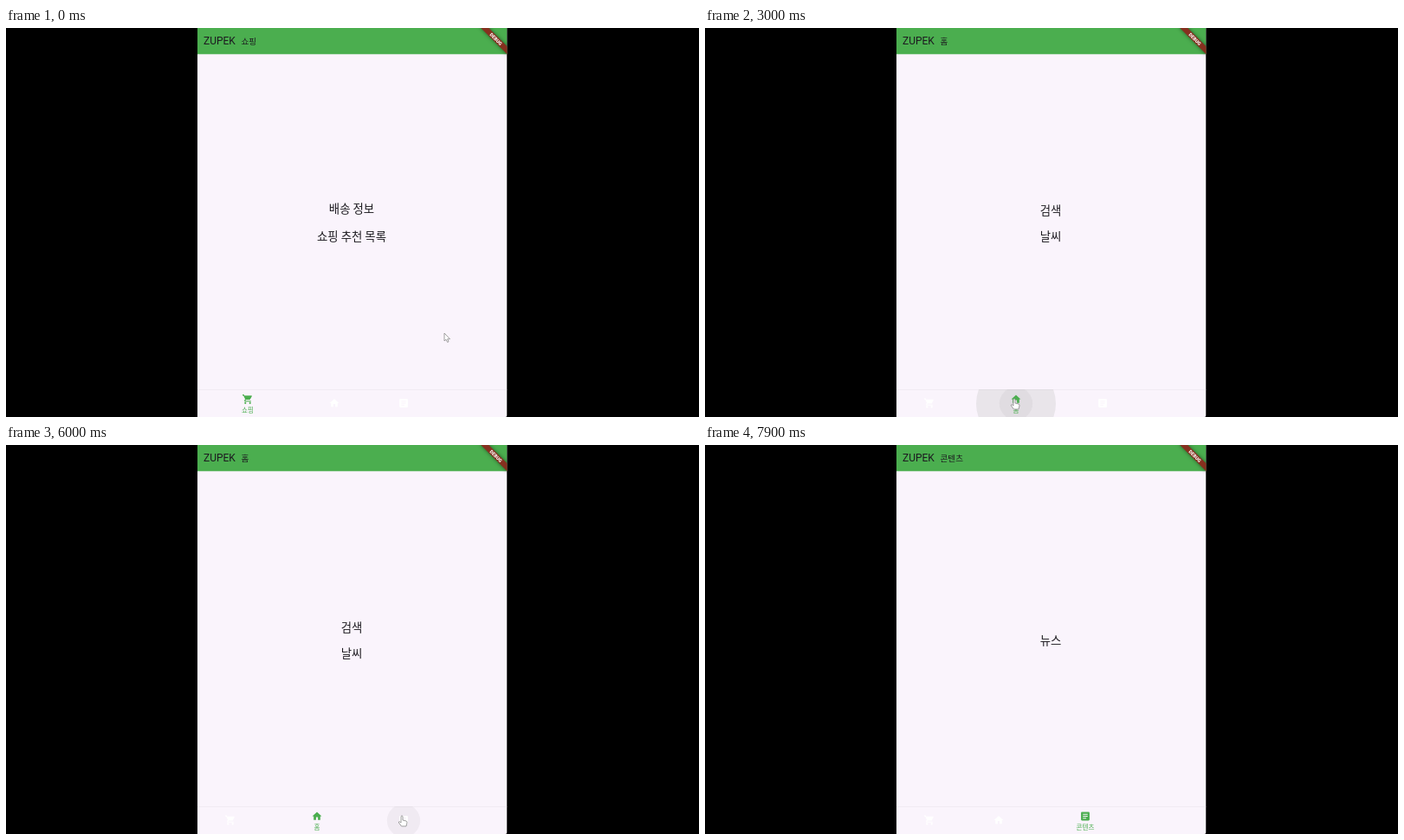
Animation, 800 px wide and 450 px high, one loop 8000 ms. Source, as an HTML page with a canvas:

```html
<!DOCTYPE html>
<html lang="ko">
<head>
<meta charset="utf-8">
<style>
  html, body { margin: 0; width: 100%; height: 100%; overflow: hidden; background: #000; }
  canvas { display: block; width: 800px; height: 450px; }
</style>
</head>
<body>
<canvas id="stage" width="800" height="450"></canvas>
<script>
const ctx = document.getElementById('stage').getContext('2d');
const LOOP = 8000, STEP = 100;
const LEFT = 221, RIGHT = 578.5, NAV_TOP = 418;
const GREEN = '#4bae4f', SURFACE = '#faf4fc', INK = '#1d1b20';
const KOREAN = '"Noto Sans CJK KR", "Noto Sans CJK", sans-serif';
const LATIN = 'Roboto, sans-serif';

const tabs = [
  { name: '쇼핑', lines: [['배송 정보', 214.3], ['쇼핑 추천 목록', 245.8]],
    icon: 'M7 18c-1.1 0-1.99.9-1.99 2S5.9 22 7 22s2-.9 2-2-.9-2-2-2zM1 2v2h2l3.6 7.59-1.35 2.45c-.16.28-.25.61-.25.96 0 1.1.9 2 2 2h12v-2H7.42c-.14 0-.25-.11-.25-.25l.03-.12.9-1.63h7.45c.75 0 1.41-.41 1.75-1.03l3.58-6.49c.08-.14.12-.31.12-.48 0-.55-.45-1-1-1H5.21l-.94-2H1zm16 16c-1.1 0-1.99.9-1.99 2s.89 2 1.99 2 2-.9 2-2-.9-2-2-2z' },
  { name: '홈', lines: [['검색', 216], ['날씨', 245.8]],
    icon: 'M10 20v-6h4v6h5v-8h3L12 3 2 12h3v8z' },
  { name: '콘텐츠', lines: [['뉴스', 230.8]],
    icon: 'M19 3H5c-1.1 0-2 .9-2 2v14c0 1.1.9 2 2 2h14c1.1 0 2-.9 2-2V5c0-1.1-.9-2-2-2zm-5 14H7v-2h7v2zm3-4H7v-2h10v2zm0-4H7V7h10v2z' }
];
tabs.forEach(tab => tab.path = new Path2D(tab.icon));

const arrow = new Path2D('M0 0V9L2 7.3 3.6 10.5 5 9.8 3.6 6.8H6.5Z');
const hand = new Path2D('M-1 .5Q0-1 1 .5V5L5 6Q6.3 6.4 6 8L5 12H-.5L-3.5 8Q-4 6.5-2.5 6.7L-1 8Z');

// Time, x and y of the pointer tip
const route = [
  [0, 506, 353], [500, 506, 353], [600, 495, 351], [700, 495, 351],
  [1600, 353, 401], [2100, 357, 429], [3400, 357, 429], [3500, 357, 420],
  [3900, 247, 16], [4000, 248, 40], [4100, 248, 40], [4200, 252, 50],
  [5000, 273, 12], [5900, 457, 429], [6500, 457, 429], [6900, 455, 352],
  [7000, 455, 352], [7500, 475, 221], [7900, 475, 221]
];
const clicks = [{ time: 2650, tab: 1 }, { time: 6150, tab: 2 }];

const clamp = v => Math.min(1, Math.max(0, v));
const smooth = v => v * v * (3 - 2 * v);
const mix = (a, b, p) => a + (b - a) * p;

function pointerAt(t) {
  const i = route.findIndex(point => point[0] > t);
  if (i < 0) return null;
  const [t0, x0, y0] = route[i - 1], [t1, x1, y1] = route[i];
  const p = smooth((t - t0) / (t1 - t0));
  return { x: mix(x0, x1, p), y: mix(y0, y1, p) };
}

function write(text, x, y, size, family, color, align = 'left', weight = 400) {
  ctx.font = `${weight} ${size}px ${family}`;
  ctx.fillStyle = color;
  ctx.textAlign = align;
  ctx.fillText(text, x, y);
}

function disc(x, y, r, color) {
  ctx.fillStyle = color;
  ctx.beginPath();
  ctx.arc(x, y, r, 0, Math.PI * 2);
  ctx.fill();
}

function drawBanner() {
  ctx.save();
  ctx.translate(RIGHT, 0);
  ctx.rotate(Math.PI / 4);
  ctx.shadowColor = 'rgba(0,0,0,.5)';
  ctx.shadowBlur = 4;
  ctx.fillStyle = '#86301f';
  ctx.fillRect(-22, 15, 44, 6.4);
  ctx.shadowBlur = 0;
  write('DEBUG', 0, 20.1, 5.5, LATIN, '#fff', 'center', 900);
  ctx.restore();
}

function drawNav(t, selected, click, pointer) {
  ctx.save();
  ctx.beginPath();
  ctx.rect(LEFT, NAV_TOP, RIGHT - LEFT, 450 - NAV_TOP);
  ctx.clip();
  ctx.fillStyle = '#f1ebf3';
  ctx.fillRect(LEFT, NAV_TOP, RIGHT - LEFT, 1);

  const age = click ? t - click.time : 0;
  const shift = click ? smooth(clamp(age / 200)) : 1;
  const hovering = pointer && pointer.y > NAV_TOP;
  let edge = 219;
  tabs.forEach((tab, i) => {
    const active = i === selected ? shift : i === selected - 1 ? 1 - shift : 0;
    const width = 80 + 40 * active, x = edge + width / 2;
    if (click && i === selected && age < 650) {
      const fade = 0.11 * clamp((650 - age) / 300);
      disc(x, 434.5, 46 * Math.sqrt(clamp(age / 350)), `rgba(90,110,90,${fade})`);
    }
    if (hovering && pointer.x >= edge && pointer.x < edge + width)
      disc(x, 434.5, 19.2, 'rgba(0,0,0,.04)');

    const tint = [75, 174, 79].map(c => Math.round(mix(255, c, active)));
    ctx.save();
    ctx.translate(x, mix(434, 429.5, active));
    ctx.scale(0.545, 0.545);
    ctx.translate(-12, -12);
    ctx.fillStyle = `rgb(${tint})`;
    ctx.fill(tab.path, 'evenodd');
    ctx.restore();

    ctx.globalAlpha = active;
    write(tab.name, x, 444.8, 7.6, KOREAN, GREEN, 'center');
    ctx.globalAlpha = 1;
    edge += width;
  });
  ctx.restore();
}

function drawPointer({ x, y }) {
  const shape = y > NAV_TOP ? hand : arrow;
  ctx.save();
  ctx.translate(x, y);
  ctx.fillStyle = '#fff';
  ctx.strokeStyle = '#888';
  ctx.lineWidth = 0.8;
  ctx.lineJoin = 'round';
  ctx.fill(shape);
  ctx.stroke(shape);
  ctx.restore();
}

function draw(t) {
  const click = clicks.filter(c => c.time <= t).pop();
  const selected = click ? click.tab : 0;
  const pointer = pointerAt(t);

  ctx.fillStyle = '#000';
  ctx.fillRect(0, 0, 800, 450);
  ctx.save();
  ctx.beginPath();
  ctx.roundRect(LEFT, 0, RIGHT - LEFT, 450, [0, 0, 2, 0]);
  ctx.clip();
  ctx.fillStyle = SURFACE;
  ctx.fillRect(LEFT, 0, RIGHT - LEFT, 450);
  ctx.fillStyle = GREEN;
  ctx.fillRect(LEFT, 0, RIGHT - LEFT, 30.3);

  write('ZUPEK', 228, 19.2, 12, LATIN, INK);
  write(tabs[selected].name, 271.5, 18.9, 9.6, KOREAN, INK);
  for (const [text, y] of tabs[selected].lines)
    write(text, 399, y, 13.4, KOREAN, INK, 'center');

  drawNav(t, selected, click, pointer);
  drawBanner();
  if (pointer) drawPointer(pointer);
  ctx.restore();
}

function tick() {
  const t = performance.now() % LOOP;
  draw(Math.floor(t / STEP) * STEP);
  requestAnimationFrame(tick);
}
tick();
</script>
</body>
</html>
```
